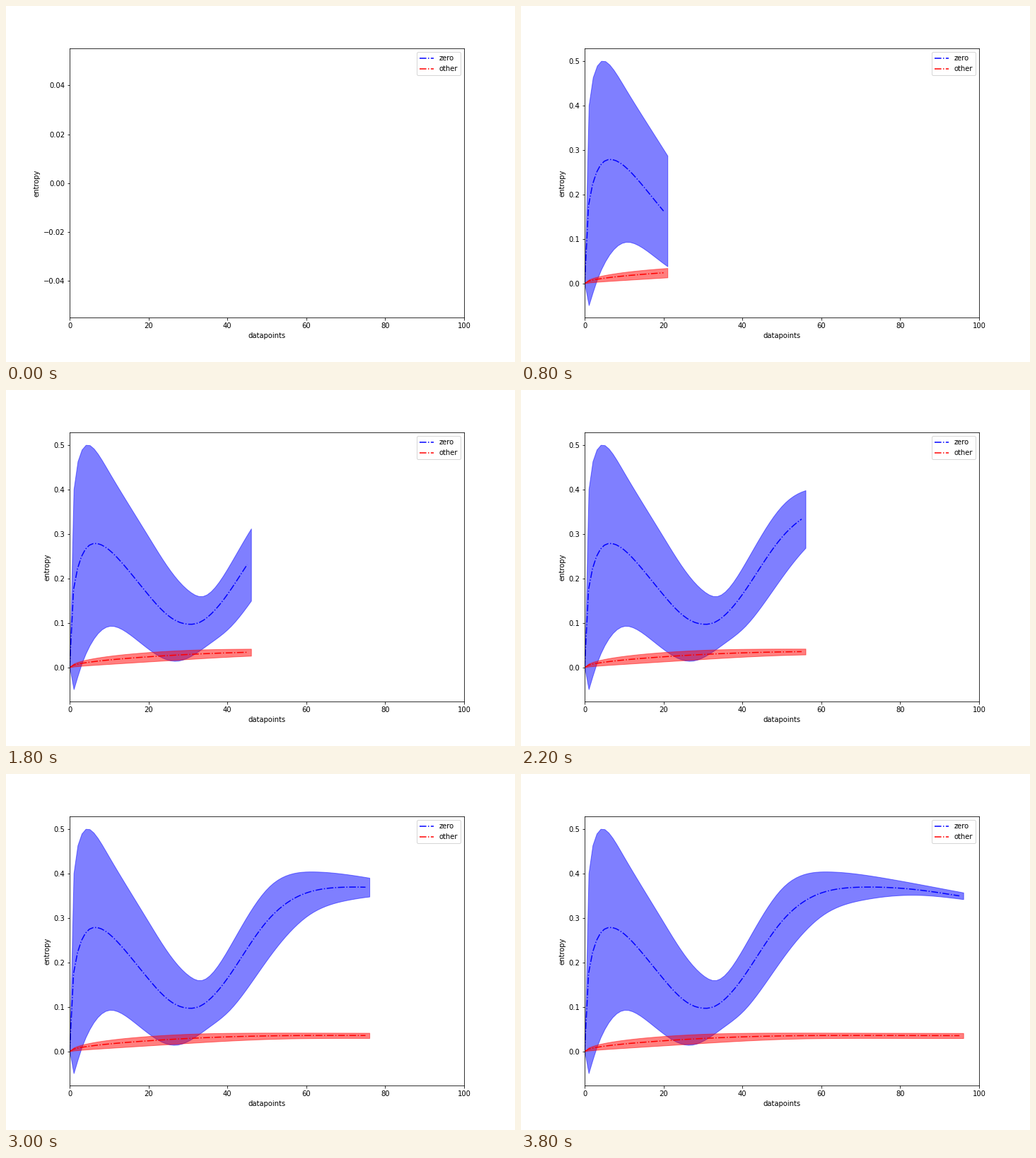
Animation of 720 by 504 pixels, one loop 4000 ms. Source, as a matplotlib script:

```python
import numpy as np
import matplotlib.pyplot as plt
from matplotlib.animation import FuncAnimation

FRAMES, STEP = 20, 5
X = np.arange((FRAMES - 1) * STEP + 1)


def curve(**points):
    """Natural cubic spline over sqrt(x), through key points x{n}=value."""
    t = np.sqrt([0] + [int(key[1:]) for key in points])
    y = np.array([0, *points.values()])
    n, h = len(t), np.diff(t)
    slope = np.diff(y) / h
    a, b = np.eye(n), np.zeros(n)
    for i in range(1, n - 1):
        a[i, i - 1:i + 2] = h[i - 1], 2 * (h[i - 1] + h[i]), h[i]
        b[i] = 6 * (slope[i] - slope[i - 1])
    m = np.linalg.solve(a, b)
    x = np.sqrt(X)
    k = np.clip(np.searchsorted(t, x, side="right") - 1, 0, n - 2)
    u, v, w = x - t[k], t[k + 1] - x, h[k]
    return ((m[k] * v**3 + m[k + 1] * u**3) / (6 * w)
            + (y[k] / w - m[k] * w / 6) * v
            + (y[k + 1] / w - m[k + 1] * w / 6) * u)


zero = (curve(x1=-.049, x2=-.019, x5=.05, x10=.0933, x20=.0385, x27=.0152,
              x35=.056, x40=.093, x50=.2135, x60=.308, x70=.341, x85=.351,
              x95=.342),
        curve(x1=.4, x2=.463, x4=.4998, x10=.435, x20=.287, x30=.169,
              x33=.16, x40=.235, x50=.371, x61=.404, x75=.39, x95=.357))
other = (curve(x10=.0078, x30=.019, x55=.029, x75=.03, x95=.0298),
         curve(x20=.0345, x32=.04, x60=.042, x95=.0413))

fig, ax = plt.subplots(figsize=(10, 7), dpi=72)
fig.subplots_adjust(left=0.125, right=0.9, bottom=0.125, top=0.88)
ax.set(xlim=(0, 100), xlabel="datapoints", ylabel="entropy")
lines = [ax.plot([], [], color + "-.", label=name)[0]
         for name, color in (("zero", "b"), ("other", "r"))]
ax.legend(loc="upper right")

bottom, top = zero[0].min(), zero[1].max()
pad = 0.05 * (top - bottom)


def update(frame):
    for band in list(ax.collections):
        band.remove()
    n = frame * STEP
    if n:
        ax.set_ylim(bottom - pad, top + pad)
    else:
        ax.set_ylim(-0.055, 0.055)
    for line, (low, high) in zip(lines, (zero, other)):
        if not n:
            line.set_data([], [])
            continue
        lo, hi = low[:n + 1], high[:n + 1]
        line.set_data(X[:n + 1], (lo + hi) / 2)
        # The band is stretched to end one unit past the line.
        ax.fill_between(np.linspace(0, n + 1, n + 1), lo, hi,
                        color=line.get_color(), alpha=0.5)
    return []


anim = FuncAnimation(fig, update, frames=FRAMES, init_func=lambda: [],
                     interval=200, repeat=True, repeat_delay=0)
plt.show()
```
